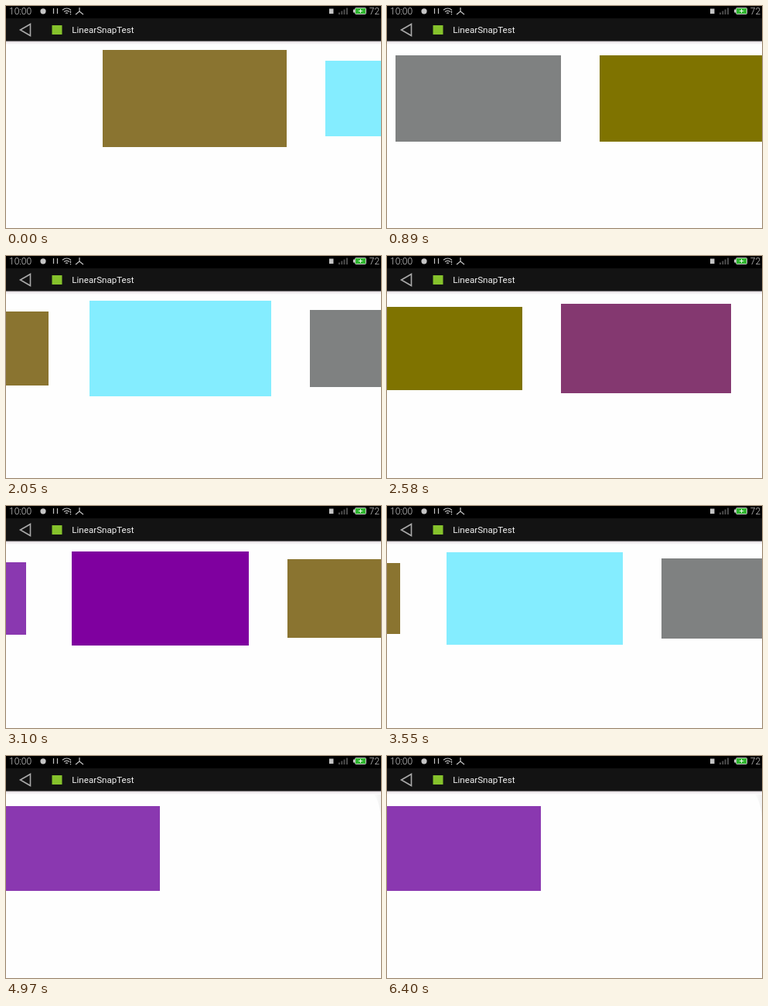
Write an HTML page that moves like this. It is 485 px wide and 288 px high and loops after 6500 ms.

```html
<!DOCTYPE html>
<html lang="en">
<head>
<meta charset="utf-8">
<title>Snap list</title>
<style>
  html, body { margin: 0; width: 100%; height: 100%; overflow: hidden; background: #fefefe; }
  svg { display: block; width: 485px; height: 288px; }
  text { font-family: Roboto, "Noto Sans", sans-serif; }
  .status { font-size: 12px; font-weight: 300; fill: #d0d0d0; }
  .title { font-size: 11.6px; fill: #f2f2f2; }
  .line { fill: none; stroke: #c4c4c4; stroke-width: 1.2; }
</style>
</head>
<body>
<svg viewBox="0 0 485 288">
  <defs>
    <linearGradient id="shade" x2="0" y2="1">
      <stop offset="0" stop-color="#b9b3b6"/>
      <stop offset=".4" stop-color="#eee8ec"/>
      <stop offset="1" stop-color="#fefefe"/>
    </linearGradient>
    <linearGradient id="edge">
      <stop offset="0" stop-color="#999" stop-opacity="0"/>
      <stop offset="1" stop-color="#999" stop-opacity=".12"/>
    </linearGradient>
  </defs>
  <rect width="485" height="288" fill="#fefefe"/>
  <g id="list"></g>
  <path id="glow" d="M473 46H485V80Q483 56 473 46Z" fill="url(#edge)"/>

  <rect y="45" width="485" height="5" fill="url(#shade)"/>
  <rect width="485" height="16" fill="#000"/>
  <rect y="16" width="485" height="29.5" fill="#131313"/>

  <!-- status bar -->
  <text class="status" x="4" y="11">10:00</text>
  <circle cx="48" cy="6.8" r="3.6" fill="#c4c4c4"/>
  <path class="line" d="M61.5 3V10M66.5 3V10"/>
  <path class="line" d="M73 5.2Q78.5 .8 84 5.2M75 7.5Q78.5 4.6 82 7.5M77 9.5Q78.5 8.2 80 9.5M83.5 6.5V9M83.5 10V11.2"/>
  <path class="line" d="M95 2V7L90 11M95 7L100 11" stroke-width="1.5"/>
  <rect x="418" y="3.5" width="5.5" height="6.5" fill="#c4c4c4"/>
  <path d="M431 11V8.5M434.3 11V6.5M437.6 11V4.5M441 11V2.5" stroke="#4c4c4c" stroke-width="2"/>
  <rect x="451.5" y="2.5" width="14" height="8" rx="1" fill="#2fb52f" stroke="#c4c4c4"/>
  <rect x="449" y="4.5" width="2" height="4" fill="#c4c4c4"/>
  <path d="M456 6.5H461M458.5 4V9" stroke="#e8ffe8"/>
  <text class="status" x="469.8" y="11">72</text>

  <!-- action bar -->
  <path d="M18.5 31L31.5 23.5V38.5Z" fill="none" stroke="#a9a9a9" stroke-width="1.6"/>
  <rect x="59.5" y="25" width="13" height="12" fill="#86c22c"/>
  <text class="title" x="85.3" y="35">LinearSnapTest</text>
</svg>
<script>
const LOOP = 6500, START = 350, END = 4970;
const COUNT = 20, PITCH = 261.8, FIRST = 244, MID = 242.5, CENTER_Y = 120;
const COLORS = ['#8a7430', '#84edff', '#7f8181', '#7f7300', '#843870', '#8a38b0', '#7f009f'];

// time, scroll offset, velocity
const KNOTS = [
  [START, 12, 1], [890, 649.6, 1.26], [2050, 2112.9, 1.264], [3100, 3447.9, 1.25],
  [3550, 3980, 1.13], [4340, 4720, .65], [END, 5123, .63]
];

// The screen refreshes every 90 ms, with a few shorter ticks.
const SHORT = [11, 19, 25, 29, 39, 43];
const ticks = [START];
for (let i = 0; ticks[i] < END; i++) ticks.push(ticks[i] + (SHORT.includes(i) ? 80 : 90));

function scrollAt(time) {
  if (time < START) return 0;
  if (time >= END) return KNOTS[KNOTS.length - 1][1];
  const t = ticks.filter(tick => tick <= time).pop();
  const i = KNOTS.findIndex(k => k[0] > t);
  const [t0, s0, v0] = KNOTS[i - 1], [t1, s1, v1] = KNOTS[i];
  const d = t1 - t0, u = (t - t0) / d, w = 1 - u;
  return s0 * w * w * (1 + 2 * u) + v0 * d * u * w * w
       + s1 * u * u * (3 - 2 * u) - v1 * d * u * u * w;
}

const list = document.getElementById('list');
const glow = document.getElementById('glow');
const cards = Array.from({ length: COUNT }, (_, i) => {
  const card = document.createElementNS('http://www.w3.org/2000/svg', 'rect');
  card.setAttribute('fill', COLORS[i % COLORS.length]);
  return list.appendChild(card);
});

function place(card, center) {
  const width = Math.max(0, 238.3 - .2027 * Math.abs(center - MID));
  const height = width * .5295;
  const left = Math.round(center - width / 2), top = Math.round(CENTER_Y - height / 2);
  card.setAttribute('x', left);
  card.setAttribute('y', top);
  card.setAttribute('width', Math.round(center + width / 2) - left);
  card.setAttribute('height', Math.round(CENTER_Y + height / 2) - top);
}

function draw(time) {
  const scroll = scrollAt(time);
  cards.forEach((card, i) => place(card, FIRST + i * PITCH - scroll));
  glow.style.display = time >= END ? '' : 'none';
}

const begin = performance.now();
function loop() {
  draw((performance.now() - begin) % LOOP);
  requestAnimationFrame(loop);
}
loop();
</script>
</body>
</html>
```
